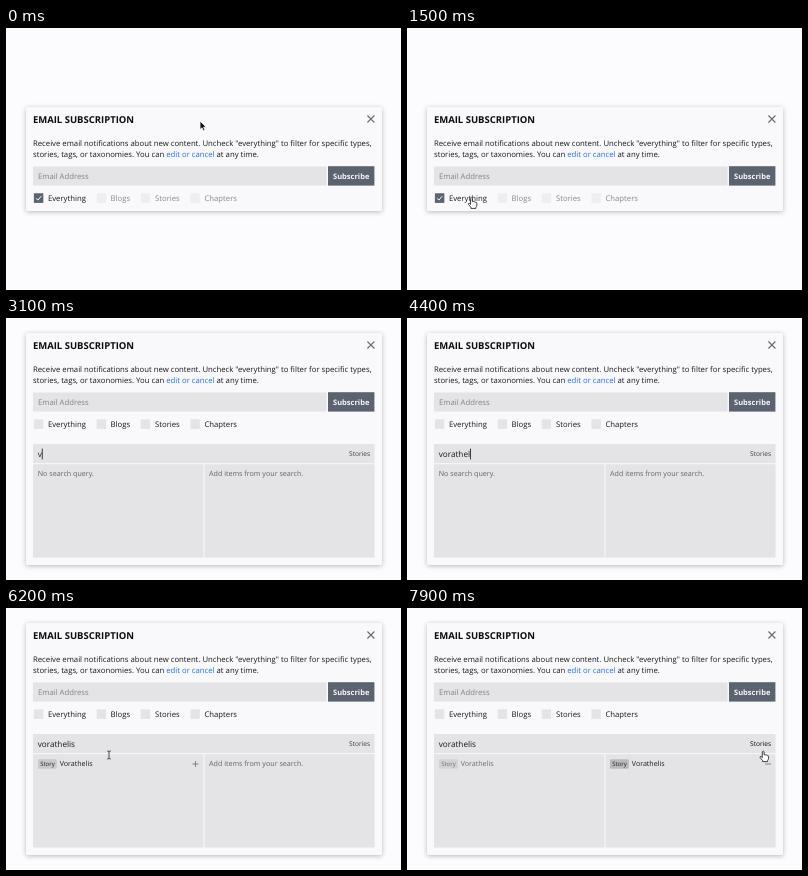
Animation, 395 px wide and 262 px high, one loop 8 s. Source, as an HTML page:

```html
<!DOCTYPE html>
<html lang="en">
<head>
<meta charset="utf-8">
<title>Email subscription</title>
<style>
  html, body { margin: 0; width: 100%; height: 100%; overflow: hidden; background: #fcfcfe; }
  svg { display: block; width: 100%; height: 100%; }
  text { font: 7.74px "Open Sans", "Noto Sans", sans-serif; fill: #17181c; text-rendering: geometricPrecision; }
  .title { font-size: 9.5px; font-weight: 700; fill: #0c0d10; }
  .button { font-size: 7.5px; font-weight: 700; fill: #f7f7fa; }
  .hint { fill: #828287; }
  .note { font-size: 7.15px; fill: #636369; }
  .item text { font-size: 7.1px; fill: #1c1d21; }
  .item .tag { font-size: 6px; }
  .item path { stroke: #6c6c72; stroke-width: .8; }
  .query { font-size: 8.2px; }
  .kind { font-size: 6.6px; text-anchor: end; fill: #3c3d43; }
  .field { fill: #e4e4e7; }
  .slate { fill: #5c6370; }
  .panel { fill: #f9f9fc; filter: drop-shadow(0 1.4px 2.8px rgba(0,0,0,.27)); }
  .pointer { fill: #111; stroke: #fff; stroke-width: .8; stroke-linejoin: round; }
</style>
</head>
<body>
<svg viewBox="0 0 395 262">
  <rect id="panel" class="panel" x="20" width="356" rx="1.5"/>

  <g id="form">
    <text class="title" x="26.9" y="30.8">EMAIL SUBSCRIPTION</text>
    <path d="M361.4 23.5l7 7m0 -7l-7 7" stroke="#6f7076" stroke-width="1.2"/>
    <text x="27" y="54">Receive email notifications about new content. Uncheck "everything" to filter for specific types,</text>
    <text x="27" y="65">stories, tags, or taxonomies. You can <tspan fill="#1f6fe8">edit or cancel</tspan> at any time.</text>
    <rect class="field" x="27" y="74.5" width="293.5" height="19"/>
    <text class="hint" x="31.9" y="87">Email Address</text>
    <rect class="slate" x="322" y="74.2" width="46.4" height="19.4"/>
    <text class="button" x="345.2" y="86.8" text-anchor="middle">Subscribe</text>
    <rect class="field" x="27.9" y="101.3" width="9.4" height="9.6"/>
    <g id="checked">
      <rect class="slate" x="27.9" y="101.3" width="9.4" height="9.6"/>
      <path d="M30.1 106.3l1.8 1.8l3.3 -3.9" fill="none" stroke="#fff"/>
    </g>
    <text x="41.9" y="109">Everything</text>
    <g id="types">
      <rect class="field" x="90.7" y="101.3" width="9.4" height="9.6"/>
      <text x="104.5" y="109">Blogs</text>
      <rect class="field" x="134.7" y="101.3" width="9.4" height="9.6"/>
      <text x="149" y="109">Stories</text>
      <rect class="field" x="184.4" y="101.3" width="9.4" height="9.6"/>
      <text x="198.4" y="109">Chapters</text>
    </g>
  </g>

  <g id="search">
    <rect class="field" x="27" y="126" width="341.5" height="19.2"/>
    <rect class="field" x="27" y="146.2" width="170.6" height="93.3"/>
    <rect class="field" x="198.6" y="146.2" width="169.9" height="93.3"/>
    <text id="placeholder" class="hint" x="31.9" y="139">Search for stories or taxonomies...</text>
    <text id="query" class="query" x="31.7" y="139"></text>
    <rect id="caret" y="130.6" width=".8" height="10.8" fill="#111"/>
    <text id="kind" class="kind" x="364.2" y="138.4">Stories</text>
    <text id="noResults" class="note" x="31.7" y="158.4">No search query.</text>
    <text id="noItems" class="note" x="203" y="158.4">Add items from your search.</text>
    <g id="result" class="item">
      <rect x="32" y="151.2" width="18.8" height="9.6" rx="1" fill="#c8c8cd"/>
      <text class="tag" x="34.2" y="158.1">Story</text>
      <text x="53.7" y="158.4">Vorathelis</text>
    </g>
    <g id="plus" class="item"><path d="M186.5 156h6m-3 -3v6"/></g>
    <g id="added" class="item">
      <rect x="203" y="151.2" width="18.8" height="9.6" rx="1" fill="#b9b9be"/>
      <text class="tag" x="205.2" y="158.1">Story</text>
      <text x="224.8" y="158.4">Vorathelis</text>
      <path d="M358 156h6"/>
    </g>
  </g>

  <g id="mouse">
    <path id="arrow" class="pointer" d="M0 0V8.6L2 6.8L3.4 10L5 9.3L3.6 6.2H6.2Z"/>
    <g id="beam" fill="none" stroke="#222" stroke-width=".8">
      <path d="M-1.8 -4Q0 -4 0 -3V3Q0 4 -1.8 4M1.8 -4Q0 -4 0 -3M0 3Q0 4 1.8 4"/>
    </g>
    <path id="hand" d="M-.9 1Q0 -.6 .9 1V4Q2 3.4 2.6 4.3Q3.6 3.8 4.2 4.8Q5.3 4.6 5.3 5.8V7.8Q5 9 4.4 9.6V10.8H-.6V9.8L-3.2 6.6Q-3.2 5.4 -2 5.8L-.9 6.8Z"
      fill="#fff" stroke="#111" stroke-width=".8" stroke-linejoin="round"/>
  </g>
</svg>

<script>
const LOOP = 8000;
const EXPAND = 1590, FOCUS = 2600, RESULTS = 5500, ADD = 6900;
const WORD = "vorathelis";
const KEY_TIMES = [3000, 3200, 3500, 3700, 3900, 4000, 4100, 4300, 4600, 4800];

// time, x, y, pointer shape from that time on
const MOUSE = [
  [0, 194, 93, "arrow"],
  [100, 194, 93, "arrow"],
  [550, 108, 139, "beam"],
  [740, 76, 157, "arrow"],
  [900, 66, 164, "hand"],
  [1200, 64.5, 169.6, "hand"],
  [EXPAND, 64.5, 170.5, "arrow"],
  [2000, 64.5, 170.5, "arrow"],
  [2400, 60, 146, "beam"],
  [2700, 58, 137, "beam"],
  [5500, 58, 137, "beam"],
  [6200, 103, 147, "beam"],
  [6350, 103, 147, "arrow"],
  [6650, 188, 155, "hand"],
  [7000, 188, 155, "hand"],
  [7200, 215, 143, "beam"],
  [7600, 341, 142, "hand"],
  [7800, 356.2, 142.8, "hand"],
  [LOOP, 356.2, 142.8, "hand"],
];

const el = id => document.getElementById(id);
const show = (id, on) => { el(id).style.display = on ? "" : "none"; };
const ease = p => p * p * (3 - 2 * p);

function drawMouse(t) {
  const next = MOUSE.findIndex(key => key[0] > t);
  const [t0, x0, y0, shape] = MOUSE[next - 1];
  const [t1, x1, y1] = MOUSE[next];
  const p = t1 === EXPAND ? 0 : ease((t - t0) / (t1 - t0));
  el("mouse").setAttribute("transform", `translate(${x0 + (x1 - x0) * p} ${y0 + (y1 - y0) * p})`);
  for (const id of ["arrow", "beam", "hand"]) show(id, id === shape);
  show("mouse", t < KEY_TIMES[0] || t >= RESULTS);
}

function caretVisible(t) {
  if (t < FOCUS || t >= ADD) return false;
  const lastKey = KEY_TIMES.filter(k => k <= t).pop() ?? FOCUS;
  return t < 4800 ? t - lastKey < 500 : Math.floor((t - 4700) / 500) % 2 === 0;
}

function draw(t) {
  const open = t >= EXPAND, found = t >= RESULTS, added = t >= ADD;
  el("panel").setAttribute("y", open ? 15 : 79);
  el("panel").setAttribute("height", open ? 232 : 104);
  el("form").setAttribute("transform", `translate(0 ${open ? 0 : 64})`);
  el("types").setAttribute("opacity", open ? 1 : .5);
  show("checked", !open);
  show("search", open);

  const typed = WORD.slice(0, KEY_TIMES.filter(k => k <= t).length);
  el("query").textContent = typed;
  show("placeholder", !typed);
  show("caret", caretVisible(t));
  if (open) el("caret").setAttribute("x", 31.7 + (typed ? el("query").getComputedTextLength() : 0));

  show("noResults", !found);
  show("result", found);
  el("result").setAttribute("opacity", added ? .6 : 1);
  show("plus", found && !added);
  show("noItems", !added);
  show("added", added);
  el("kind").style.fill = t >= 7600 ? "#0c0d10" : "";
  drawMouse(t);
}

function frame() {
  draw(performance.now() % LOOP);
  requestAnimationFrame(frame);
}
frame();
</script>
</body>
</html>
```
